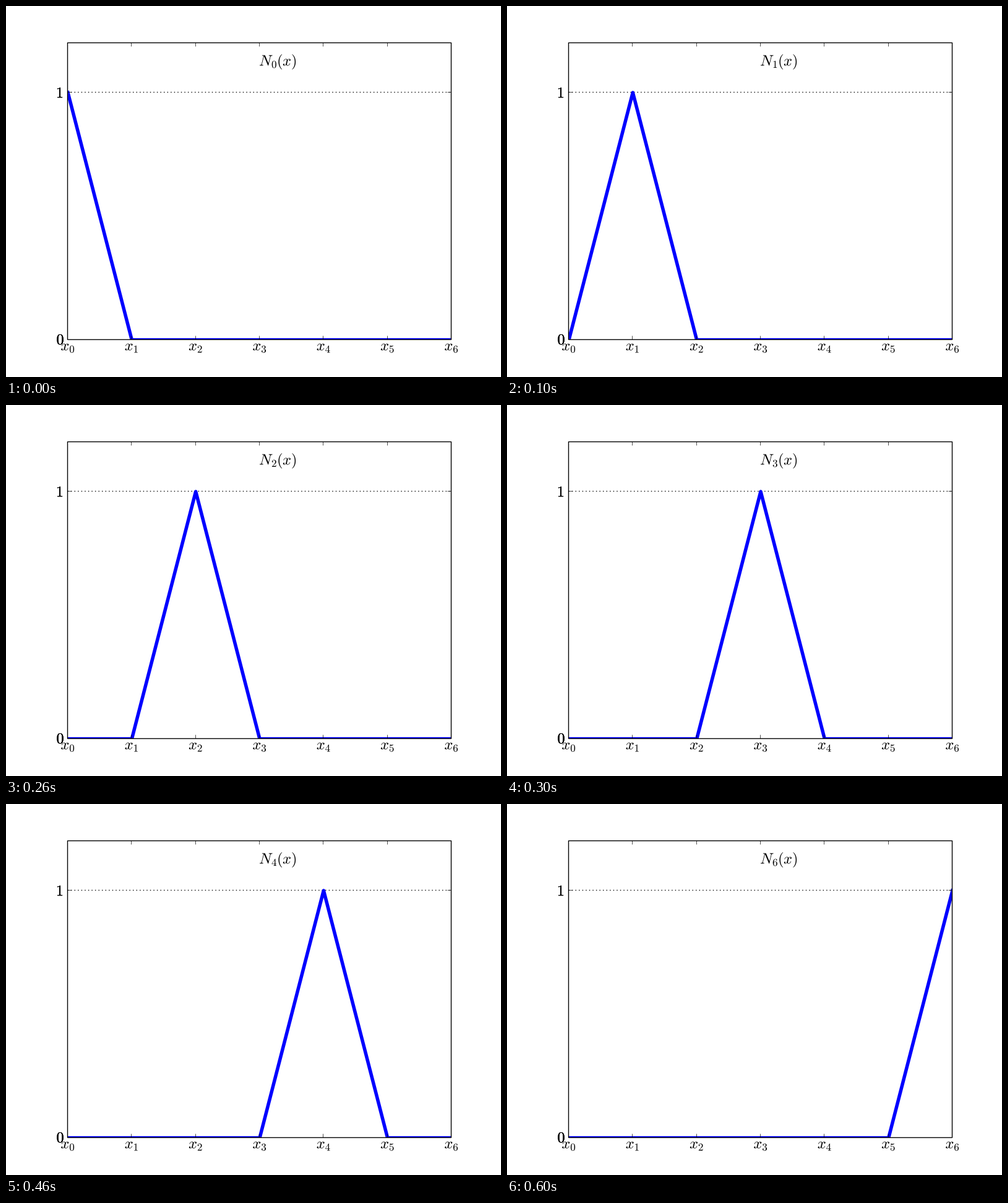
Animation, 800 px wide and 600 px high, one loop 700 ms. Source, as a matplotlib script:

```python
import matplotlib.pyplot as plt
import numpy as np
from matplotlib.animation import FuncAnimation
from matplotlib.patches import PathPatch, Rectangle
from matplotlib.path import Path
from matplotlib.textpath import TextPath

plt.rcParams["mathtext.fontset"] = "cm"

W, H, DPI = 800, 600, 100
PX = 72 / DPI                       # points per pixel
LEFT, RIGHT, TOP, BOTTOM = 100, 720, 60, 540
ONE = 140                           # height of the value 1
N = 7
EM = 24.5
SUB = 0.7 * EM
nodes = np.linspace(LEFT, RIGHT, N)

fig = plt.figure(figsize=(W / DPI, H / DPI), dpi=DPI, facecolor="white")
ax = fig.add_axes([0, 0, 1, 1])
ax.set_xlim(0, W)
ax.set_ylim(H, 0)
ax.axis("off")


def glyphs(s, x, y, size=EM):
    """Outline of a math string with its baseline starting at (x, y)."""
    p = TextPath((0, 0), f"${s}$", size=size)
    return Path(p.vertices * [1, -1] + [x, y], p.codes)


def write(s, x, y, size=EM):
    patch = PathPatch(glyphs(s, x, y, size), fc="black", lw=0, zorder=4)
    return ax.add_patch(patch)


def write_centred(s, cx, cy):
    box = glyphs(s, 0, 0).get_extents()
    return write(s, cx - (box.x0 + box.x1) / 2, cy - (box.y0 + box.y1) / 2)


def line(xs, ys, width, **kw):
    return ax.plot(xs, ys, lw=width, snap=False, **kw)[0]


def snap(v):
    return np.floor(v + 0.5) - 0.5


def tick(xs, ys):
    line(xs, ys, 0.5, color="black", zorder=3, solid_capstyle="butt")


# frame, ticks and the dotted level line
x0, x1, y0, y1 = (snap(v) for v in (LEFT, RIGHT, TOP, BOTTOM))
ax.add_patch(Rectangle((x0, y0), x1 - x0, y1 - y0, fill=False, ec="black",
                       lw=1, snap=False, zorder=3.5))
for x in snap(nodes):
    tick([x, x], [y1, y1 - 6])
    tick([x, x], [y0, y0 + 6])
for y in (snap(ONE), y1):
    tick([x0, x0 + 6], [y, y])
    tick([x1, x1 - 6], [y, y])
line([x0, x1], [snap(ONE)] * 2, 1, color="black", zorder=1,
     linestyle=(0, (1, 3)), dash_capstyle="butt")

# labels; the y labels are overprinted, which makes them heavier
for i, x in enumerate(nodes):
    write("x", x - 11.6, 557)
    write(str(i), x + 2.2, 560.6, SUB)
for _ in range(3):
    write_centred("1", 87, 140)
    write_centred("0", 87.5, 539.3)

# title N_i(x)
BASE = 96.5
for s, x in (("N", 409), ("(", 438), ("x", 447), (")", 461)):
    write(s, x, BASE)
index = write("0", 429, BASE + 3.6, SUB)

hat = line(nodes, np.full(N, BOTTOM), 4, color="blue", zorder=2,
           solid_capstyle="projecting", solid_joinstyle="round")
hat.set_clip_path(Rectangle((LEFT, TOP), RIGHT - LEFT, BOTTOM - TOP,
                            transform=ax.transData))


def update(i):
    value = (np.arange(N) == i).astype(float)
    hat.set_ydata(BOTTOM - value * (BOTTOM - ONE))
    index.set_path(glyphs(str(i), 429, BASE + 3.6, SUB))
    return hat, index


anim = FuncAnimation(fig, update, frames=N, interval=100, repeat=True,
                     repeat_delay=0, blit=False)
plt.show()
```
